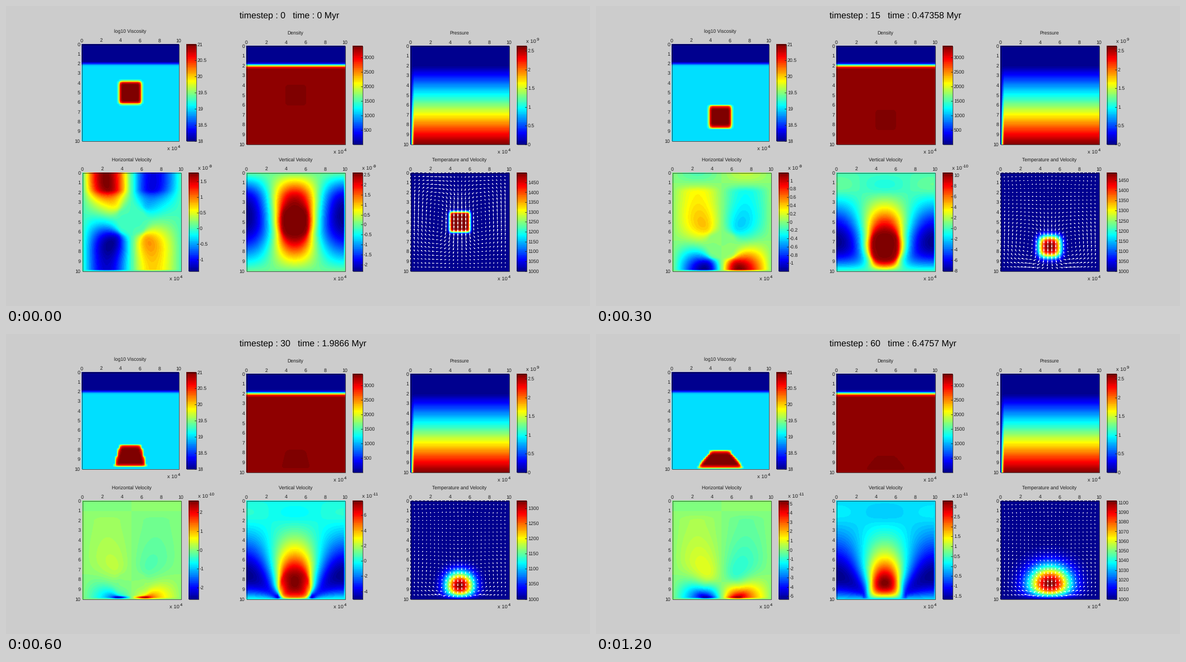
A matplotlib script that plays this animation: 1043x537 px, repeating every 1.3 s.

```python
import math

import numpy as np
import matplotlib.pyplot as plt
from matplotlib.animation import FuncAnimation
from matplotlib.colors import ListedColormap
from matplotlib.patches import Rectangle

W, H, DPI = 1043, 537, 100
PX = 72 / DPI
FONT = "Liberation Sans"
INK = "#1c1c1c"
FRAMES = 13
NX, NY = 25, 50          # cells in the left half of the symmetric box
SURFACE = 10             # node row of the rock surface

# Greatest sinking speed, every ten steps
PEAK = [2.6e-9, 1.75e-9, 6.24e-10, 7.9e-11, 5.47e-11, 4.12e-11, 3.3e-11]

plt.rcParams["text.hinting"] = "none"

node = np.linspace(0, 10, 51)
X, Y = np.meshgrid(node, node)
erf = np.vectorize(math.erf)


def jet(n=64):
    s = 4 * np.arange(1, n + 1) / n
    return ListedColormap(np.clip(1.5 - np.abs(s[:, None] - [3, 2, 1]), 0, 1))


def upsample_matrix(n=176):
    pos = (np.arange(n) + .5) / n * 50
    return np.clip(1 - np.abs(pos[:, None] - np.arange(51)), 0, 1)


CMAP, UP = jet(), upsample_matrix()


def million_years(step):
    return np.interp(step, [0, 10, 20, 30, 60], [0, .29668, .65048, 1.9866, 6.4757])


def ramp(d, width=.42):
    return np.clip(.5 + d / width, 0, 1)


def block(step):
    """Share of block material at each node, and the block's centre."""
    spread = 1 - (1 - np.clip((step - 20) / 40, 0, 1)) ** 1.8
    bottom = 9.7 - 3.7 * np.exp(-.6 * (step / 10) ** 1.53)
    height = 2 - .6 * spread ** 1.5
    top = bottom - height
    down = np.clip((Y - top) / height, 0, 1)
    half = 1 - .1 * spread + 1.15 * spread * down
    share = ramp(half - np.abs(X - 5)) * ramp(Y - top) * ramp(bottom - Y)
    return share, bottom - height / 2


# Operators on the inner nodes of the stream function
def diff_matrix(n):
    return np.eye(n, n - 1) - np.eye(n, n - 1, -1)


GX, GY = diff_matrix(NX), diff_matrix(NY)
SHEAR = np.kron(np.eye(NY - 1), GX.T @ GX) - np.kron(GY.T @ GY, np.eye(NX - 1))
STRETCH = 2 * np.kron(GY, GX)


def flow_field(share, visc, free):
    """Slow viscous flow with slip on all walls, driven by the heavy block."""
    half = visc[:, :NX + 1] - 19
    inner = 10 ** half[1:-1, 1:-1].ravel()
    cells = 10 ** ((half[1:, 1:] + half[1:, :-1] + half[:-1, 1:] + half[:-1, :-1]) / 4)
    a = (SHEAR.T * inner) @ SHEAR + (STRETCH.T * cells.ravel()) @ STRETCH
    if not free:
        rows = (SURFACE - 1) * (NX - 1) + np.arange(NX - 1)
        a[rows, rows] += 1e5
    push = (share[1:-1, 2:NX + 1] - share[1:-1, :NX - 1]).ravel()
    psi = np.zeros((NY + 1, NX + 1))
    psi[1:-1, 1:-1] = np.linalg.solve(a, push).reshape(NY - 1, NX - 1)
    psi = np.hstack([psi, -psi[:, -2::-1]])
    vx = np.pad(np.diff(psi, axis=0), ((0, 1), (0, 0)))
    vz = np.pad(-np.diff(psi, axis=1), ((0, 0), (0, 1)))
    if free:
        vx *= 1 + .35 * np.cos(np.pi * X / 10)
    return vx, vz


def smear(z, blur):
    return .5 * (erf((z + 1) / blur) - erf((z - 1) / blur))


def heat(centre, myr):
    """Diffusing hot square above a floor held cold by its mirror image."""
    blur = math.sqrt(.03 + .568 * myr)
    down = smear(node - centre, blur) - smear(20 - node - centre, blur)
    return 1000 + 499 * np.outer(down, smear(node - 5, blur))


def state(i):
    step = 5 * i
    share, centre = block(step)
    visc = 18 + ramp(Y - 2) + np.log10(1 + 99 * share)
    rho = 1 + 3299 * ramp(Y - 2, .5) + 100 * share
    press = 2.63e9 * np.clip((Y - 2) / 8, 0, 1) * np.clip(X / .35, 0, 1)
    vx, vz = flow_field(share, visc, free=i == 0)
    peak = np.exp(np.interp(step / 10, range(7), np.log(PEAK)))
    vx, vz = vx * peak / vz.max(), vz * peak / vz.max()
    temp = heat(centre, million_years(step))
    return [(visc, 18, 21), (rho, 1, 3400), (press, 0, 2.63e9),
            (vx, vx.min(), vx.max()), (vz, vz.min(), vz.max()),
            (temp, 1000, temp.max())]


STATES = [state(i) for i in range(FRAMES)]


def tick_step(span):
    base = 10.0 ** (math.floor(math.log10(span)) - 1)
    for k in (1, 2, 5, 10, 20, 50):
        if span / (k * base) <= (10.3 if k in (5, 50) else 12):
            return k * base


fig = plt.figure(figsize=(W / DPI, H / DPI), dpi=DPI, facecolor="#cccccc")
ax = fig.add_axes([0, 0, 1, 1])
ax.axis("off")


def text(x, y, s, size=8.8, **kw):
    kw.setdefault("color", INK)
    return ax.text(x, y, s, fontsize=size * PX, family=FONT, va="baseline", **kw)


def frame(x, y, w, h):
    ax.add_patch(Rectangle((x + .5, y + .5), w, h, fill=False, ec="black",
                           alpha=.75, lw=.8 * PX, zorder=4))


def power_label(x, y, power):
    text(x, y, "x 10", 9.4)
    return text(x + 19, y - 4, power, 7.5, color="black")


class Panel:
    def __init__(self, x, y, size, title, sci=False):
        self.x, self.y, self.size, self.sci = x, y, size, sci
        self.bar = x + size + 14
        self.edge = self.bar + 17
        low = y + size + 1
        self.image = ax.imshow(np.zeros((176, 176)), cmap=CMAP, aspect="auto",
                               interpolation="nearest",
                               extent=(x, x + size + 1, low, y))
        ax.imshow(np.arange(64)[::-1, None], cmap=CMAP, aspect="auto",
                  interpolation="nearest", extent=(self.bar, self.edge + 1, low, y))
        frame(x, y, size, size)
        frame(self.bar, y, 17, size)
        text(x + size / 2, y - 20, title, 8.7, ha="center")
        for k in range(11):
            d = k * size / 10 + .5
            text(x - 2.5, y + d + 3, str(k), ha="right")
            if k % 2 == 0:
                text(x + d, y - 3.5, str(k), ha="center")
        power_label(x + size - 20, y + size + 17, "4")
        if sci:
            self.power = power_label(self.edge, y - 5, "")
        self.labels = [text(self.edge + 3, y, "") for _ in range(14)]
        self.marks, = ax.plot([], [], color=INK, lw=.8 * PX, zorder=5)

    def show(self, data, lo, hi):
        self.image.set_data(UP @ data @ UP.T)
        self.image.set_clim(lo, hi)
        scale = 1
        if self.sci:
            e = math.floor(math.log10(max(hi, -lo) / 1.05))
            scale = 10.0 ** e
            self.power.set_text(str(e))
        lo, hi = lo / scale, hi / scale
        step = tick_step(hi - lo)
        first, last = math.ceil(lo / step - 1e-6), math.floor(hi / step + 1e-6)
        xs, ys = [], []
        for label in self.labels:
            label.set_text("")
        for label, k in zip(self.labels, range(first, last + 1)):
            y = self.y + .5 + self.size * (hi - k * step) / (hi - lo)
            label.set_text(f"{round(k * step, 6):g}")
            label.set_y(y + 3)
            xs += [self.edge - 2, self.edge, np.nan]
            ys += [y, y, np.nan]
        self.marks.set_data(xs, ys)


panels = [Panel(135, 68, 173, "log10 Viscosity"),
          Panel(429, 71, 176, "Density"),
          Panel(722, 71, 176, "Pressure", True),
          Panel(136, 298, 176, "Horizontal Velocity", True),
          Panel(429, 298, 176, "Vertical Velocity", True),
          Panel(722, 298, 176, "Temperature and Velocity")]
heading = text(417, 22, "", 15.9, color="black")

last = panels[-1]
arrows, = ax.plot([], [], color="white", lw=.8 * PX, zorder=3)
arrows.set_clip_path(Rectangle((last.x, last.y), last.size, last.size,
                               transform=ax.transData))
ax.set_xlim(0, W)
ax.set_ylim(H, 0)


def arrow_lines(vx, vz, longest=6.6, head=.33):
    u, v = vx[::2, ::2].ravel(), vz[::2, ::2].ravel()
    size = np.hypot(u, v)
    length = np.maximum(size / size.max() * longest, 1)
    still = size < 1e-12 * size.max()
    size[still], u[still] = 1, 1
    u, v = u / size * length, v / size * length
    x = last.x + .5 + X[::2, ::2].ravel() * last.size / 10
    y = last.y + .5 + Y[::2, ::2].ravel() * last.size / 10
    tx, ty, gap = x + u, y + v, np.full_like(x, np.nan)
    px = [x, tx, gap, tx - head * (u + head * v), tx, tx - head * (u - head * v), gap]
    py = [y, ty, gap, ty - head * (v - head * u), ty, ty - head * (v + head * u), gap]
    return np.stack(px, 1).ravel(), np.stack(py, 1).ravel()


def update(i):
    fields = STATES[i]
    for panel, field in zip(panels, fields):
        panel.show(*field)
    arrows.set_data(*arrow_lines(fields[3][0], fields[4][0]))
    heading.set_text(f"timestep : {5 * i}   time : {million_years(5 * i):.5g} Myr")


anim = FuncAnimation(fig, update, frames=FRAMES, init_func=lambda: update(0),
                     interval=100, repeat=True, repeat_delay=0, blit=False)
plt.show()
```
